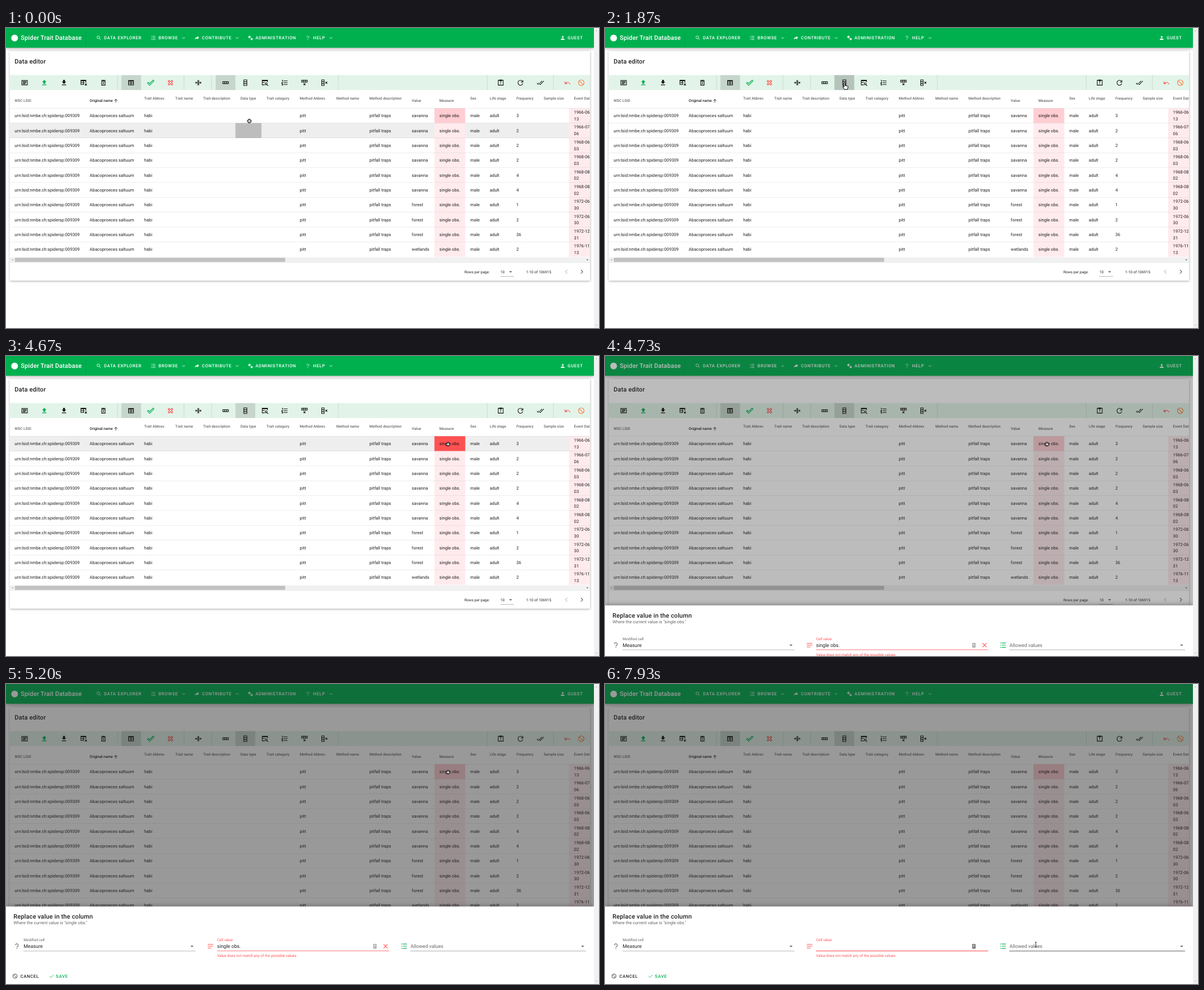
Animation of 1053 by 532 pixels, one loop 8000 ms. Source, as an HTML page with a canvas:

```html
<!DOCTYPE html>
<html lang="en">
<head>
<meta charset="utf-8">
<title>Data editor</title>
<style>
html, body { margin: 0; width: 100%; height: 100%; overflow: hidden; background: #fff; }
canvas { display: block; }
</style>
</head>
<body>
<canvas id="stage" width="1053" height="532"></canvas>
<script>
const ctx = document.getElementById('stage').getContext('2d');
const LOOP = 8000, STEP = 1000 / 15;
const GREEN = '#00b04f', RED = '#ff5252', INK = 'rgba(0,0,0,.87)', SOFT = 'rgba(0,0,0,.6)', LINE = 'rgba(0,0,0,.12)';
const BODY = 7.69, SMALL = 6.59, FIELD = 8.78, TITLE = 10.98;
const ROW_TOP = 142.3, ROW_H = 26.35, SHEET_TOP = 394.5;

// Icons on a 24 unit grid: outlines are stroked, solids are filled.
const outline = {
  card: 'M3 5H21V19H3ZM6 9H18M6 12H18M6 15H15',
  tableRemove: 'M19 12V4H3V18H13M3 6H19M3 12H15M11 6V18M16 15l6 6m0-6l-6 6',
  trash: 'M6.5 8H17.5V20H6.5ZM5 5H19M9 4H15M10 11.5l4 5m0-5l-4 5',
  table: 'M4 5H20V19H4ZM4 7H20M4 13H20M12 7V19',
  cross: 'M4.4 16.7L9.2 12L4.4 7.3L7.3 4.4L12 9.2L16.7 4.4L19.6 7.3L14.8 12L19.6 16.7L16.7 19.6L12 14.8L7.3 19.6Z',
  row: 'M3 9H21V15H3ZM9 9V15M15 9V15',
  column: 'M7 3H17V21H7ZM7 9H17M7 15H17',
  tableSearch: 'M11 19H3V4H20V10M3 6H20M3 11H11M18.5 15.5a3 3 0 1 0-6 0a3 3 0 1 0 6 0M18 18l4 4',
  numbers: 'M8 6H21M8 12H21M8 18H21M3 4h1.5v4M2.5 10.5h2.5l-2.5 3.5h2.8M2.5 16.5h2.5v3.5h-2.5',
  rowRemove: 'M3 4H21V10H3ZM9 4V10M15 4V10M9 14l6 6m0-6l-6 6',
  columnRemove: 'M3 3H11V21H3ZM3 9H11M3 15H11M15 9l6 6m0-6l-6 6',
  clipboard: 'M4 4H20V20H4ZM9 3H15V6H9ZM12 8V13M12 15V17',
  refresh: 'M18.5 7.5a8 8 0 1 0 1.2 7M20 4V10H14',
  checkAll: 'M1 13l5 5M6 12.5l5.5 5.5L23 6.5M17 6.5l-6 6',
  undo: 'M4 8V15H11M5 14Q13 6 21 17',
  cancel: 'M21 12a9 9 0 1 0-18 0a9 9 0 1 0 18 0M6 6L18 18',
  search: 'M15.5 9.5a6 6 0 1 0-12 0a6 6 0 1 0 12 0M14 14l6.5 6.5',
  list: 'M8 5H21M8 12H21M8 19H21M3 5h3M3 12h3M3 19h3',
  cogs: 'M12 8a4 4 0 1 0-8 0a4 4 0 1 0 8 0M8 2V14M2 8H14M21 17a3.500 3.500 0 1 0-7 0a3.500 3.500 0 1 0 7 0M17.500 12V22M12.500 17H22.500',
  help: 'M7.500 8.500a4.500 4.500 0 1 1 7.500 3.500q-3 2-3 4M12 18.500V21',
  down: 'M6 9l6 6l6-6', left: 'M15 6l-6 6l6 6', right: 'M9 6l6 6l-6 6',
  sort: 'M12 20V5.500M5 12.700L12 5.500L19 12.700',
  notes: 'M3 6H21M3 12H21M3 18H15',
  clear: 'M5.500 5.500L18.500 18.500M18.500 5.500L5.500 18.500',
  check: 'M3.500 12.500L9 18L20.500 6.500',
  box: 'M7 5H17V20H7ZM11 9H12.500V16M10 16H15'
};
const solid = {
  upload: 'M9 16V10H5L12 3L19 10H15V16ZM5 20V18H19V20Z',
  download: 'M5 20H19V18H5ZM19 9H15V3H9V9H5L12 16Z',
  checkOutline: 'M19.8 2.2L24 6.4L8.4 22L0 13.5L4.2 9.300L8.4 13.5ZM19.8 5L8.4 16.4L4.2 12.2L2.8 13.500L8.4 19.2L21.2 6.4Z',
  squeeze: 'M13 20V4H15V20ZM10 20V4H12V20ZM5 8L9 12L5 16V13H2V11H5ZM20 16L16 12L20 8V11H23V13H20Z',
  share: 'M21 11L14 4V8Q5 9 3 19Q7 14 14 14V18Z',
  account: 'M12 4a4 4 0 1 0 .1 0ZM12 14Q20 14 20 18V20H4V18Q4 14 12 14Z',
  caret: 'M7 10L12 15L17 10Z'
};
const shapes = {};
for (const k in outline) shapes[k] = new Path2D(outline[k]);
for (const k in solid) shapes[k] = new Path2D(solid[k]);

function icon(name, x, y, color = '#111', size = 13.2) {
  ctx.save();
  ctx.translate(x - size / 2, y - size / 2);
  ctx.scale(size / 24, size / 24);
  ctx.strokeStyle = ctx.fillStyle = color;
  ctx.lineWidth = 2;
  if (solid[name]) ctx.fill(shapes[name], 'evenodd');
  else ctx.stroke(shapes[name]);
  ctx.restore();
}
function rect(x, y, w, h, color) {
  ctx.fillStyle = color;
  ctx.fillRect(x, y, w, h);
}
function disc(x, y, r, color) {
  ctx.fillStyle = color;
  ctx.beginPath();
  ctx.arc(x, y, r, 0, 7);
  ctx.fill();
}
function text(s, x, y, size = BODY, color = INK, weight = 400, spacing = 0) {
  ctx.font = `${weight} ${size}px Roboto, "Open Sans", sans-serif`;
  ctx.letterSpacing = size * spacing + 'px';
  ctx.fillStyle = color;
  ctx.fillText(s, x, y + size * 0.355);
}
const button = (s, x, y, color) => text(s, x, y, BODY, color, 500, 0.085);
function shadowed(x, y, w, h, color, blur, dy) {
  ctx.save();
  ctx.shadowColor = 'rgba(0,0,0,.35)';
  ctx.shadowBlur = blur;
  ctx.shadowOffsetY = dy;
  rect(x, y, w, h, color);
  ctx.restore();
}

const clamp = v => Math.max(0, Math.min(1, v));
const span = (t, a, b) => clamp((t - a) / (b - a));
const smooth = p => p * p * (3 - 2 * p);
// cubic-bezier(.25, .8, .25, 1)
function decel(x) {
  let lo = 0, hi = 1;
  for (let i = 0; i < 24; i++) {
    const u = (lo + hi) / 2;
    if (0.75 * u * (1 - u) + u ** 3 < x) lo = u; else hi = u;
  }
  return 2.4 * (1 - lo) ** 2 * lo + 3 * (1 - lo) * lo * lo + lo ** 3;
}

// Pointer stops: time, x, y
const stops = [
  [-67, 437, 176], [0, 432, 165], [600, 425.5, 97], [2400, 425.5, 97], [3000, 767, 144],
  [3267, 785, 149.5], [3467, 785, 156.5], [5533, 785, 156.5], [6400, 673.5, 464],
  [6467, 673, 467], [7467, 673, 467], [7933, 765, 462]
];
function pointer(t) {
  let i = 0;
  while (i < stops.length - 2 && t >= stops[i + 1][0]) i++;
  const [a, b] = [stops[i], stops[i + 1]], p = smooth(span(t, a[0], b[0]));
  return { x: a[1] + (b[1] - a[1]) * p, y: a[2] + (b[2] - a[2]) * p };
}

// Column: title, left edge of its text, value, title on the lower line
const columns = [
  ['WSC LSID', 15.3, 'urn:lsid:nmbe.ch:spidersp:009309', 1], ['Original name', 148.6, 'Abacoproeces saltuum', 1],
  ['Trait Abbrev.', 245.2, 'habi'], ['Trait name', 300.6], ['Trait description', 350], ['Data type', 416.2],
  ['Trait category', 462.4], ['Method Abbrev.', 521.6, 'pitt'], ['Method name', 586.4],
  ['Method description', 645.2, 'pitfall traps'], ['Value', 720.6, '', 1], ['Measure', 769.6, 'single obs.', 1],
  ['Sex', 824.3, 'male'], ['Life stage', 859, 'adult'], ['Frequency', 906.2], ['Sample size', 954.8], ['Event Date', 1008.6]
];
const MEASURE = 11, DATE = 16;
const records = [
  ['savanna', 3, '1966-06-13'], ['savanna', 2, '1966-07-06'], ['savanna', 2, '1968-06-03'], ['savanna', 2, '1968-06-03'],
  ['savanna', 4, '1968-08-02'], ['savanna', 4, '1968-08-02'], ['forest', 1, '1972-06-30'], ['forest', 2, '1972-06-30'],
  ['forest', 36, '1972-12-31'], ['wetlands', 2, '1976-11-13']
];
const colLeft = i => i ? columns[i][1] - 8.8 : 6.5;
const colRight = i => i < DATE ? colLeft(i + 1) : 1037;
const colAt = x => columns.findIndex((c, i) => x >= colLeft(i) && x < colRight(i));

function appBar() {
  shadowed(0, 0, 1044, 35, GREEN, 5, 1.5);
  disc(15.3, 17.8, 6, '#fff');
  text('Spider Trait Database', 26.3, 17.6, TITLE, '#fff', 500, 0.0125);
  rect(141.5, 3, 0.6, 29, 'rgba(0,0,0,.12)');
  const menu = [
    ['search', 165, 'DATA EXPLORER', 174], ['list', 261.5, 'BROWSE', 270.8, 315.5], ['share', 339, 'CONTRIBUTE', 348, 410.5],
    ['cogs', 434, 'ADMINISTRATION', 443], ['help', 536, 'HELP', 545.3, 577], ['account', 988.5, 'GUEST', 997.3]
  ];
  for (const [name, ix, label, x, more] of menu) {
    icon(name, ix, 17.6, '#fff', 9.9);
    button(label, x, 17.6, '#fff');
    if (more) icon('down', more, 17.6, '#fff', 9.9);
  }
}

function toolbar(t, near) {
  rect(6.5, 83.5, 1030.5, 26.5, '#e2f4e9');
  const byColumn = t >= 1530, chosen = 'rgba(0,0,0,.12)';
  rect(204.8, 83.5, 35, 26.5, chosen);
  rect(byColumn ? 407.4 : 372.3, 83.5, 35.1, 26.5, chosen);
  if (!byColumn && near.y < 108) rect(407.4, 83.5, 35.1, 26.5, 'rgba(0,0,0,.04)');
  if (t >= 1467 && t < 2070) {
    ctx.save();
    ctx.beginPath();
    ctx.rect(407.4, 83.5, 35.1, 26.5);
    ctx.clip();
    ctx.globalAlpha = 0.14 * (1 - span(t, 1750, 2070));
    disc(425, 97, 5 + 18 * smooth(span(t, 1440, 1760)), '#000');
    ctx.restore();
  }
  for (const x of [198, 316, 365, 590, 854.3, 972]) rect(x - 0.3, 83.5, 0.7, 26.5, 'rgba(0,0,0,.15)');
  const tools = [
    ['card', 33], ['upload', 68, GREEN], ['download', 103], ['tableRemove', 138], ['trash', 173], ['table', 222],
    ['checkOutline', 257, GREEN], ['cross', 292, RED], ['squeeze', 341.2], ['row', 390], ['column', 425], ['tableSearch', 460],
    ['numbers', 495], ['rowRemove', 530], ['columnRemove', 565.5], ['clipboard', 878.5], ['refresh', 913.5], ['checkAll', 949],
    ['undo', 997, RED], ['cancel', 1021.5, '#ff7a3d']
  ];
  for (const [name, x, color] of tools) icon(name, x, 97, color);
}

function table(t, near) {
  const active = t < 4700;
  const hoverRow = active && near.y >= 142.8 ? Math.floor((near.y - ROW_TOP) / ROW_H) : -1;
  const hoverCol = colAt(near.x);
  const hoverHead = active && near.y > 110 && near.y < 142.8;
  ctx.save();
  ctx.beginPath();
  ctx.rect(6.5, 110, 1030.5, 297);
  ctx.clip();
  columns.forEach(([name, x, , low], i) => {
    const lit = hoverHead && i === hoverCol, y = low ? 128.7 : 124.2;
    text(name, x, y, SMALL, i === 1 || lit ? INK : SOFT, 500);
    if (i === 1) icon('sort', 195, 129, '#111', 9.9);
    else if (lit) {
      const w = ctx.measureText(name).width;
      icon('sort', low ? x + w + 5 : x + 5, low ? 129 : 134, 'rgba(0,0,0,.4)', 9.9);
    }
  });
  records.forEach(([place, count, date], r) => {
    const top = ROW_TOP + r * ROW_H, y = top + 13.2;
    if (r === hoverRow) rect(6.5, top, 1030.5, ROW_H, '#eee');
    rect(colLeft(MEASURE), top, 54.7, ROW_H, r ? '#ffebee' : '#ffcdd2');
    rect(colLeft(DATE), top, 38, ROW_H, '#ffebee');
    if (r === hoverRow) rect(colLeft(hoverCol), top, colRight(hoverCol) - colLeft(hoverCol), ROW_H, hoverCol === MEASURE ? RED : '#bdbdbd');
    columns.forEach(([, x, value], i) => { if (value) text(value, x, y); });
    text(place, columns[10][1], y);
    text(String(count), columns[14][1], y);
    text(date.slice(0, 8), columns[DATE][1], y - 6.1);
    text(date.slice(8), columns[DATE][1], y + 5.6);
  });
  for (let r = 0; r < 10; r++) rect(6.5, ROW_TOP + r * ROW_H - 0.4, 1030.5, 0.6, LINE);
  ctx.restore();
}

function triangle(x, y, dx, dy, color) {
  ctx.fillStyle = color;
  ctx.beginPath();
  ctx.moveTo(x + dx, y + dy);
  ctx.lineTo(x - dx + dy, y - dy + dx);
  ctx.lineTo(x - dx - dy, y - dy - dx);
  ctx.fill();
}

function footer() {
  rect(6.5, 406.5, 1030.5, 9.2, '#f1f1f1');
  rect(15.7, 407.5, 480, 7.2, '#c1c1c1');
  triangle(11.3, 411, -1.3, 0, '#a3a3a3');
  triangle(1032.700, 411, 1.300, 0, '#505050');
  rect(6.5, 415.7, 1030.5, 0.5, LINE);
  text('Rows per page:', 814, 432.3, SMALL);
  text('10', 878, 432.3, SMALL);
  icon('caret', 896, 432.3, SOFT);
  rect(877.7, 440, 24.5, 0.6, 'rgba(0,0,0,.45)');
  text('1-10 of 106915', 923.7, 432.3, SMALL);
  icon('left', 995, 432.3, 'rgba(0,0,0,.26)');
  icon('right', 1022.500, 432.3, SOFT);
}

function tooltip(t) {
  const a = smooth(span(t, 470, 710)) * (1 - smooth(span(t, 1480, 1740)));
  if (!a) return;
  ctx.save();
  ctx.globalAlpha = a;
  ctx.fillStyle = 'rgba(97,97,97,.9)';
  ctx.beginPath();
  ctx.roundRect(343.5, 63.800, 163.700, 17.200, 2.2);
  ctx.fill();
  text('Edit the selected value in the whole column', 351.8, 72.3, BODY, '#fff');
  ctx.restore();
}

function sheet(t, mouse) {
  const p = decel(span(t, 4667, 4967));
  if (!p) return;
  rect(0, 0, 1044, 532, `rgba(33,33,33,${0.46 * p})`);
  const cleared = t >= 7400, overList = t > 7500 && mouse.x > 700;
  ctx.save();
  ctx.beginPath();
  ctx.rect(0, 0, 1044, 532);
  ctx.clip();
  ctx.translate(0, (1 - p) * (532 - SHEET_TOP));
  shadowed(0, SHEET_TOP, 1044, 140, '#fff', 8, -1);
  text('Replace value in the column', 13.2, 412.3, TITLE, INK, 500, 0.0125);
  text('Where the current value is "single obs."', 13.2, 423.4, BODY, SOFT);
  icon('help', 19.3, 465, SOFT);
  text('Modified cell', 31.2, 453.6, SMALL, SOFT);
  text('Measure', 31.2, 465, FIELD);
  icon('caret', 330.3, 465, SOFT);
  rect(31, 473, 305.5, 0.6, 'rgba(0,0,0,.45)');
  icon('notes', 363.2, 465, RED);
  text('Cell value', 374.8, 453.6, SMALL, RED);
  if (!cleared) {
    text('single obs.', 374.8, 465, FIELD);
    icon('clear', 674, 465, RED);
  }
  icon('box', 655, 465, cleared ? '#111' : '#777', 11);
  rect(374.700, 472.8, 305.700, cleared ? 1.1 : 0.8, RED);
  text('Value does not match any of the possible values', 374.8, 481.6, SMALL, RED);
  icon('list', 706.8, 465, GREEN);
  text('Allowed values', 718.2, 465, FIELD, SOFT);
  icon('caret', 1024, 465, SOFT);
  rect(718, 473, 312, 0.7, overList ? INK : 'rgba(0,0,0,.45)');
  icon('cancel', 16, 518, '#222', 9.9);
  button('CANCEL', 25.500, 518, INK);
  icon('check', 81, 518, GREEN, 9.9);
  button('SAVE', 88.600, 518, GREEN);
  ctx.restore();
}

const hand = new Path2D('M-1 1Q0-.6 1 1V5L5 6Q6.300 6.300 6 8L5 12H0L-3 8Q-3.600 6-2 6.600L-1 7.800Z');
const arrow = new Path2D('M0 0V10L2.300 8L4 11.500L5.500 10.800L4 7.400H7Z');
const plus = new Path2D('M-3.800 0H3.800M0-3.800V3.800');
const beam = new Path2D('M-1.600-4H1.600M0-4V4M-1.600 4H1.600');

function cursor(t, { x, y }) {
  let kind = 'arrow';
  if (t < 5590) kind = y > 142.8 ? 'plus' : y > 110 || x < 442 ? 'hand' : 'arrow';
  else if (x > 718 && t > 7467) kind = 'beam';
  else if (y > 458 && x < 681) kind = 'hand';
  ctx.save();
  ctx.translate(x, y);
  ctx.strokeStyle = '#000';
  if (kind === 'plus') {
    ctx.lineWidth = 3.6;
    ctx.stroke(plus);
    ctx.strokeStyle = '#fff';
    ctx.lineWidth = 1.7;
    ctx.scale(0.8, 0.8);
    ctx.stroke(plus);
  } else if (kind === 'beam') {
    ctx.lineWidth = 0.8;
    ctx.stroke(beam);
  } else {
    const shape = kind === 'hand' ? hand : arrow;
    ctx.fillStyle = '#fff';
    ctx.lineWidth = 1;
    ctx.fill(shape);
    ctx.stroke(shape);
  }
  ctx.restore();
}

function draw(t) {
  const mouse = pointer(t), near = pointer(t - STEP);
  ctx.textRendering = 'geometricPrecision';
  rect(0, 0, 1053, 532, '#fff');
  shadowed(6.5, 41, 1030.5, 407, '#fff', 4, 1);
  appBar();
  text('Data editor', 15.3, 59.3, TITLE, INK, 500, 0.0125);
  toolbar(t, near);
  table(t, near);
  footer();
  tooltip(t);
  sheet(t, mouse);
  rect(1044, 0, 9, 532, '#f1f1f1');
  triangle(1048.5, 4.7, 0, -1.1, '#a3a3a3');
  triangle(1048.5, 527.3, 0, 1.1, '#a3a3a3');
  cursor(t, mouse);
}

const start = performance.now();
function tick() {
  const t = (performance.now() - start) % LOOP;
  draw(Math.floor((t + 4) / STEP) * STEP);
  requestAnimationFrame(tick);
}
tick();
</script>
</body>
</html>
```
